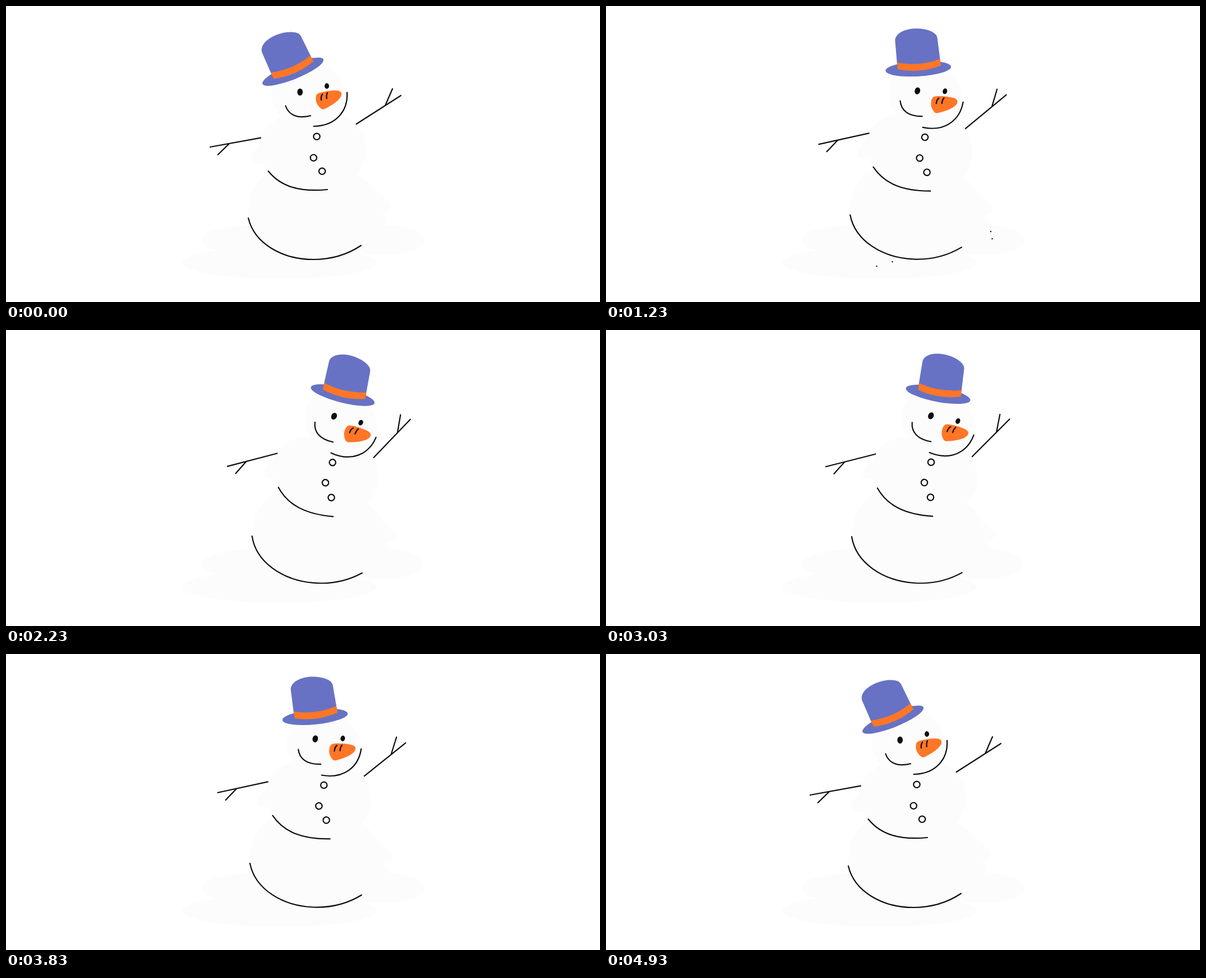
An HTML page for the animation above (5010 ms loop, 1059x529 px).

```html
<!DOCTYPE html>
<html lang="en">
<head>
<meta charset="utf-8">
<title>Swaying snowman</title>
<style>
  html, body { margin: 0; width: 100%; height: 100%; overflow: hidden; background: #fff; }
  svg { display: block; width: 100%; height: 100%; }
  .snow { fill: #fcfcfc; }
  .line { fill: none; stroke: #0d0d0d; stroke-width: 2.2; stroke-linecap: round; stroke-linejoin: round; }
  .ink { fill: #0d0d0d; }
  .felt { fill: #6772c4; }
  .orange { fill: #ff7626; }
</style>
</head>
<body>
<svg viewBox="0 0 1059 529">
  <g class="snow">
    <ellipse cx="450" cy="418" rx="101" ry="27"/>
    <ellipse cx="670" cy="418" rx="75" ry="27"/>
    <ellipse cx="487" cy="459" rx="173" ry="29"/>
  </g>
  <g id="specks" class="ink">
    <circle cx="686" cy="403" r="1.2"/>
    <circle cx="688.5" cy="416" r="1.2"/>
    <circle cx="510.5" cy="457" r="1.2"/>
    <circle cx="482.5" cy="465" r="1.2"/>
  </g>

  <g id="base">
    <path class="snow" d="M432 379C430 345 440 316 468 297L622 299C645 310 657 325 664 336C674 342 686 350 686 358C685 366 673 367 671 372C680 376 680 386 676 393C666 408 650 418 633 428C609 444 580 453 548 453C493 453 443 425 432 379Z"/>
    <path class="line" d="M432 379C443 425 493 453 548 453C580 453 609 444 633 428"/>

    <g id="torso">
      <path class="snow" d="M467 295C463 288 460 283 455 281C445 283 437 281 438 271C440 255 455 250 455 232C464 213 478 205 490 199L600 195C628 208 641 235 641 258C641 280 632 292 622 302L573 328C524 333 490 323 467 295Z"/>
      <path class="line" d="M467.5 295C490 323 524 333 573 328"/>
      <g class="line">
        <circle cx="554" cy="233.3" r="5.7"/>
        <circle cx="548.3" cy="271.2" r="5.7"/>
        <circle cx="563.6" cy="295.3" r="5.7"/>
      </g>
      <path id="armL" class="line" d="M454 235.7L364 252M398 246L377.7 265.7"/>
      <path id="armR" class="line" d="M624.5 211L704 160M676 178L689 148"/>

      <g id="head">
        <ellipse class="snow" cx="540" cy="159" rx="66" ry="57"/>
        <g class="line">
          <path d="M498.5 178.5C504 195 520 202 543 196"/>
          <path d="M548.5 215C588 214 610 188 608 154.5"/>
        </g>
        <ellipse class="ink" cx="524.2" cy="153.8" rx="4.9" ry="6.3"/>
        <ellipse class="ink" cx="572" cy="143" rx="4" ry="5.1"/>
        <path class="orange" d="M556 156.5C563 153 578 151 588 151C596 151 599 154 598 159C596 169 577 180 567 184.5C562 186.500 553 176 552.500 168C552 162 553 158 556 156.500Z"/>
        <path class="line" d="M562 168C561.5 164 562 160 564.3 157.5M571.8 165.500C571 161 571.500 158 573 155"/>

        <g id="hat">
          <ellipse class="felt" cx="511.6" cy="117.4" rx="58.5" ry="13.5" transform="rotate(-22 511.6 117.4)"/>
          <path class="felt" d="M456 82C453 68 470 54 492 48.5C507 45 522 46 526 54L543 89L548 99Q517 125 477.500 130L472 119Z"/>
          <path class="orange" d="M472 119Q511 114 542.700 88.500L548 99Q517 125 477.500 130Z"/>
        </g>
      </g>
    </g>
  </g>
</svg>
<script>
  const LOOP = 5010, STEPS = 100;

  // part: swing in degrees, pivot x, pivot y (each nested in its parent)
  const joints = {
    base:  [5, 561, 452],
    torso: [6, 535, 330],
    head:  [16, 541, 215],
    hat:   [10, 541, 172],
    armL:  [-15.5, 454, 236],
    armR:  [-25, 624.5, 211]
  };
  const byId = id => document.getElementById(id);
  const parts = Object.entries(joints).map(([id, joint]) => [byId(id), ...joint]);
  const specks = byId('specks');

  // Steps alternate between 30 ms and 70 ms.
  function stepAt(ms) {
    const step = 2 * Math.floor(ms / 100) + (ms % 100 >= 30 ? 1 : 0);
    return Math.min(step, STEPS - 1);
  }

  function draw(ms) {
    const step = stepAt(ms);
    const lean = (1 - Math.cos(2 * Math.PI * step / STEPS)) / 2;
    for (const [el, swing, x, y] of parts) {
      el.setAttribute('transform', `rotate(${(swing * lean).toFixed(3)} ${x} ${y})`);
    }
    specks.setAttribute('visibility', step >= 24 && step < 40 ? 'visible' : 'hidden');
  }

  const start = performance.now();
  function tick() {
    draw((performance.now() - start) % LOOP);
    requestAnimationFrame(tick);
  }
  draw(0);
  requestAnimationFrame(tick);
</script>
</body>
</html>
```
